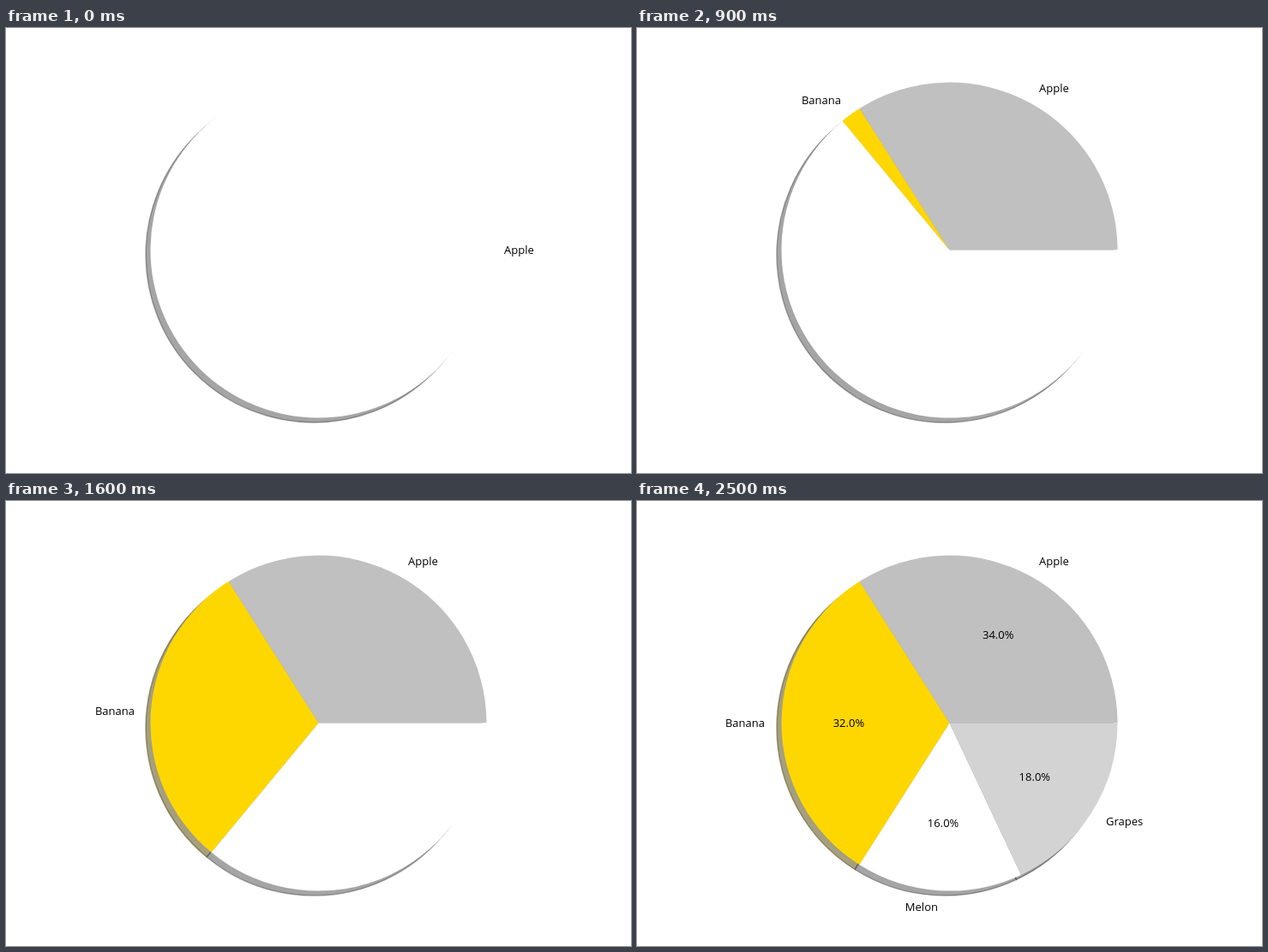
Recreate the animation shown at these times as an HTML page. Size 729x520 px, loop 2.6 s.

```html
<!DOCTYPE html>
<html lang="en">
<head>
<meta charset="utf-8">
<title>Fruit pie</title>
<style>
  html, body { margin: 0; width: 100%; height: 100%; overflow: hidden; background: #fff; }
  svg { display: block; width: 729px; height: 520px; }
  text { font: 13px "Open Sans", "Noto Sans", sans-serif; fill: #000; }
</style>
</head>
<body>
<svg id="pie" viewBox="0 0 729 520" xmlns="http://www.w3.org/2000/svg"></svg>
<script>
const svg = document.getElementById('pie');
const CX = 364.5, CY = 259.6, R = 196;
const SHIFT = R / 36, EDGE = 100 / 72;
const STEP = 100, STEPS = 26;

const slices = [
  { name: 'Apple', size: 34, rgb: [192, 192, 192] },
  { name: 'Banana', size: 32, rgb: [255, 215, 0] },
  { name: 'Melon', size: 16, rgb: [255, 255, 255] },
  { name: 'Grapes', size: 18, rgb: [211, 211, 211] }
];

// Percent of the circle, counter-clockwise from the right.
function polar(pct, r) {
  const a = pct / 50 * Math.PI;
  return [CX + r * Math.cos(a), CY - r * Math.sin(a)];
}

function wedge(from, to) {
  const at = p => polar(p, R).map(v => v.toFixed(3)).join(' ');
  const arc = p => `A${R} ${R} 0 0 0 ${at(p)}`;
  return `M${CX} ${CY}L${at(from)}${arc((from + to) / 2)}${arc(to)}Z`;
}

function shadow(w) {
  const c = `rgb(${w.rgb.map(v => Math.round(v * 0.3))})`;
  return `<path d="${wedge(w.from, w.to)}" transform="translate(${-SHIFT} ${SHIFT})" ` +
    `fill="${c}" fill-opacity=".5" stroke="${c}" stroke-opacity=".5" stroke-width="${EDGE}"/>`;
}

function face(w) {
  return `<path d="${wedge(w.from, w.to)}" fill="rgb(${w.rgb})"/>`;
}

function text(str, x, y, anchor) {
  return `<text x="${x}" y="${Math.round(y + 4.2)}" text-anchor="${anchor}">${str}</text>`;
}

function label(w) {
  const [x, y] = polar((w.from + w.to) / 2, R * 1.1);
  return text(w.name, Math.round(x + 0.5), y, x > CX ? 'start' : 'end');
}

function share(w) {
  const [x, y] = polar((w.from + w.to) / 2, R * 0.6);
  return text(w.size.toFixed(1) + '%', x.toFixed(1), y, 'middle');
}

function draw(step) {
  const done = step * 100 / (STEPS - 1);
  const named = [];
  let from = 0;
  for (const s of slices) {
    const to = Math.min(from + s.size, done);
    if (to > from || from === 0) named.push({ ...s, from, to });
    from += s.size;
  }
  const wedges = named.filter(w => w.to > w.from);
  if (done < 100) wedges.push({ rgb: [255, 255, 255], from: done, to: 100 });

  svg.innerHTML = wedges.map(shadow).join('') + wedges.map(face).join('') +
    named.map(label).join('') + (done >= 100 ? named.map(share).join('') : '');
}

let shown = 0;
const start = performance.now();

function tick(now) {
  const step = Math.floor(Math.max(0, now - start) / STEP) % STEPS;
  if (step !== shown) draw(shown = step);
  requestAnimationFrame(tick);
}

draw(0);
requestAnimationFrame(tick);
</script>
</body>
</html>
```
